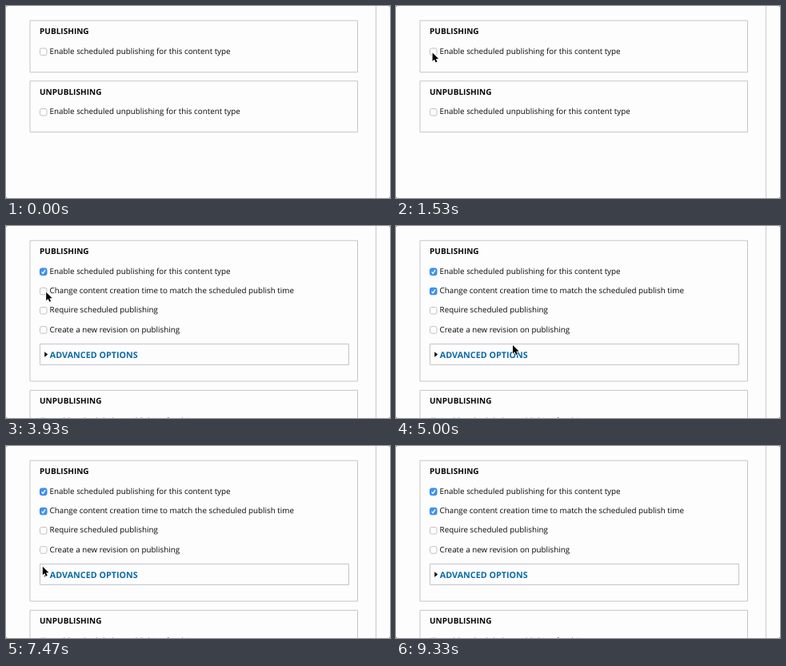
Animation of 480x240 px, one loop 9.99 s. Source, as an HTML page with a canvas:

```html
<!DOCTYPE html>
<html lang="en">
<head>
<meta charset="utf-8">
<title>Scheduling options</title>
<style>
  html, body { margin: 0; width: 100%; height: 100%; overflow: hidden; background: #fefdfe; }
  canvas { display: block; }
</style>
</head>
<body>
<canvas id="stage" width="480" height="240"></canvas>
<script>
const ctx = document.getElementById('stage').getContext('2d');
const LOOP = 9.99;
const FPS = 15;
const FONT = '"Open Sans", "Noto Sans", sans-serif';
const EXTRA_OPTIONS = [
  'Change content creation time to match the scheduled publish time',
  'Require scheduled publishing',
  'Create a new revision on publishing'
];

const rowBaseline = row => 60 + 24.2 * row;
const stop = (x, y, arrive, leave, bend = 1) => ({ x, y, arrive, leave, bend });
const rowStop = (row, x, arrive, leave) => stop(x, rowBaseline(row) - 1.5, arrive, leave);

// Where the pointer rests, with arrival and departure in seconds
const STOPS = [
  stop(135, 134, 0.26, 0.26),
  rowStop(0, 45.6, 1, 2.4),
  rowStop(1, 50.2, 3.47, 4.6),
  stop(146, 149, 4.8, 5),
  rowStop(2, 49.4, 5.4, 6),
  stop(45.4, 133, 6.33, 7.24),
  stop(146, 242, 8.13, 8.13, 3)
];
const OPEN_AT = STOPS[1].leave;
const MATCH_AT = STOPS[2].leave;
const CLICKS = [1.467, OPEN_AT - 1 / FPS, MATCH_AT - 1 / FPS];

const smooth = u => u * u * (3 - 2 * u);

function pointerAt(t) {
  const i = STOPS.findIndex(s => t < s.arrive);
  if (i < 1) return null;
  const from = STOPS[i - 1], to = STOPS[i];
  const e = smooth(Math.max(0, (t - from.leave) / (to.arrive - from.leave)));
  return [from.x + (to.x - from.x) * e ** to.bend, from.y + (to.y - from.y) * e];
}

function text(str, x, y, size = 9.83, weight = 400, color = '#080808') {
  ctx.font = `${weight} ${size}px ${FONT}`;
  ctx.fillStyle = color;
  ctx.fillText(str, x, y);
}

function stroke(color, width = 1) {
  ctx.strokeStyle = color;
  ctx.lineWidth = width;
  ctx.stroke();
}

function fill(color) {
  ctx.fillStyle = color;
  ctx.fill();
}

function path(points) {
  ctx.beginPath();
  points.forEach(p => ctx.lineTo(...p));
}

function frame(x, y, w, h) {
  ctx.beginPath();
  ctx.rect(x, y, w, h);
  stroke('#c4c5ca');
}

function checkbox(y, checked) {
  ctx.beginPath();
  ctx.roundRect(42.5, y, 8.5, 8.5, 2);
  fill(checked ? '#3f94f3' : '#ffffff');
  stroke(checked ? '#3483e2' : '#c0c0c3');
  if (!checked) return;
  path([[44.6, y + 4.5], [46.2, y + 6.4], [49.1, y + 2]]);
  stroke('#ffffff', 1.3);
}

function option(label, baseline, checked) {
  checkbox(baseline - 6.9, checked);
  text(label, 54.6, baseline);
}

function fieldset(title, label, top, bottom, checked) {
  frame(30, top, 409.5, bottom - top);
  text(title, 42, top + 16.8, 10.05, 700);
  option(label, top + 41.6, checked);
}

function advanced() {
  frame(42.5, 147.5, 386, 26);
  path([[48.2, 157.3], [52.2, 160.6], [48.2, 163.9]]);
  fill('#111111');
  text('ADVANCED OPTIONS', 54.8, 164.7, 10.75, 700, '#0b6aa6');
}

function cursor(x, y) {
  ctx.save();
  ctx.translate(x, y);
  ctx.scale(0.92, 0.92);
  path([[0, 0], [0, 11.4], [2.6, 9.1], [4.4, 13.1], [6.4, 12.2], [4.6, 8.3], [8.2, 8.1]]);
  ctx.closePath();
  ctx.lineJoin = 'round';
  stroke('#ffffff', 1.6);
  fill('#000000');
  ctx.restore();
}

function ring(x, y) {
  ctx.beginPath();
  ctx.arc(x + 0.5, y + 1, 17.5, 0, Math.PI * 2);
  stroke('rgba(0, 0, 0, 0.5)', 1.5);
}

function corners() {
  for (const x of [0, 480]) {
    for (const y of [0, 240]) {
      path([[x, y], [Math.abs(x - 1.6), y], [x, Math.abs(y - 1.6)]]);
      fill('#8a8a8a');
    }
  }
}

function draw(t) {
  const open = t >= OPEN_AT;
  ctx.textRendering = 'geometricPrecision';
  ctx.fillStyle = '#fefdfe';
  ctx.fillRect(0, 0, 480, 240);
  ctx.fillStyle = '#c8c8cc';
  ctx.fillRect(462, 0, 1, 240);

  fieldset('PUBLISHING', 'Enable scheduled publishing for this content type', 18.2, open ? 194 : 82.8, open);
  if (open) {
    EXTRA_OPTIONS.forEach((label, i) => option(label, rowBaseline(i + 1), i === 0 && t >= MATCH_AT));
    advanced();
  }
  const top = open ? 205.3 : 93.8;
  fieldset('UNPUBLISHING', 'Enable scheduled unpublishing for this content type', top, top + 63.9, false);
  corners();

  const pos = pointerAt(t);
  if (!pos) return;
  if (CLICKS.some(c => Math.abs(t - c) < 0.5 / FPS)) ring(...pos);
  cursor(...pos);
}

function loop() {
  const t = (performance.now() / 1000) % LOOP;
  draw(Math.floor((t + 0.004) * FPS) / FPS + 0.001);
  requestAnimationFrame(loop);
}
loop();
</script>
</body>
</html>
```
